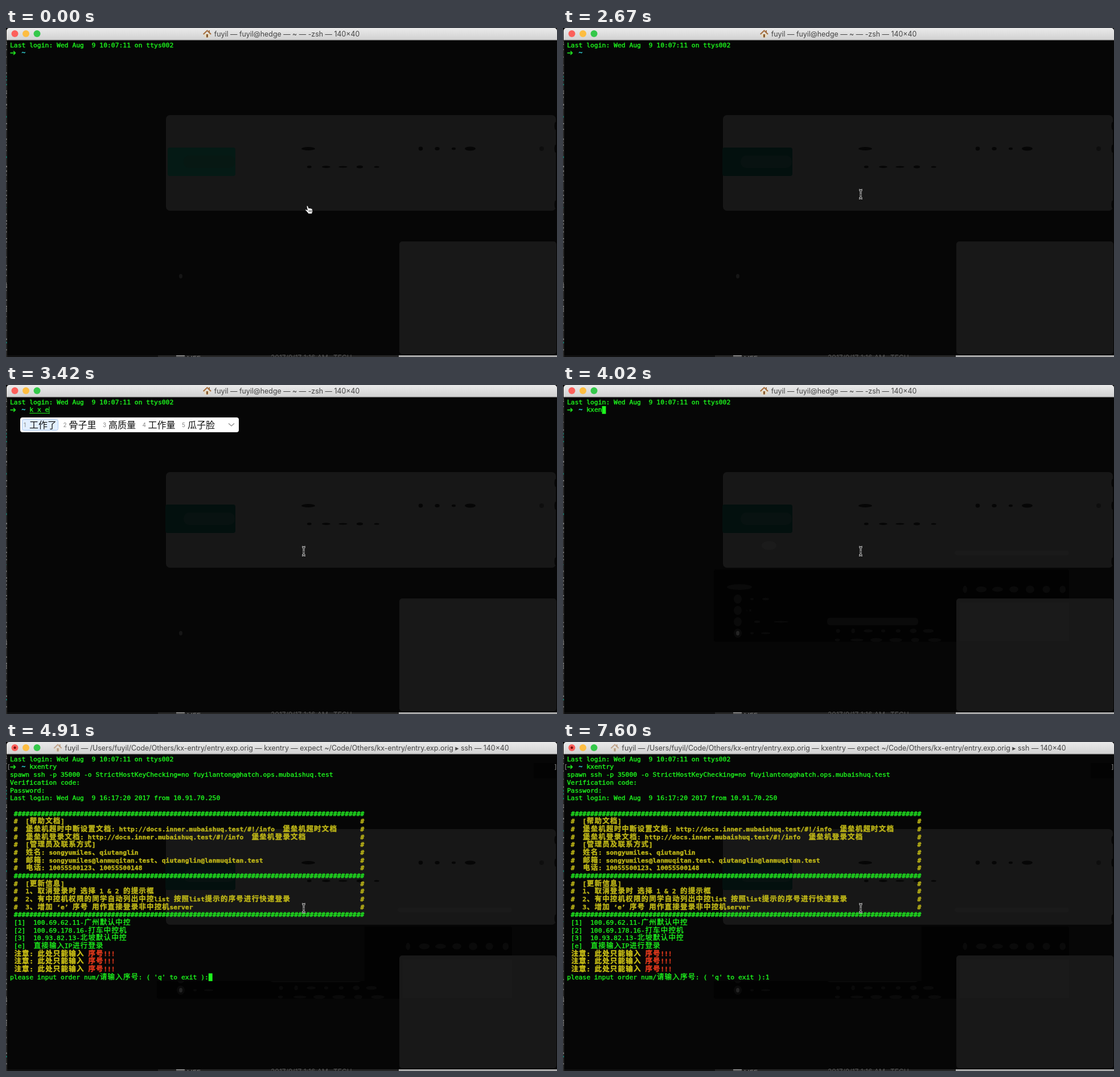
An HTML page with a canvas for the animation above (8000 ms loop, 968 by 578 pixels).

```html
<!DOCTYPE html>
<html lang="zh-CN">
<head>
<meta charset="utf-8">
<title>Terminal login</title>
<style>
html, body { margin: 0; width: 100%; height: 100%; overflow: hidden; background: #060606; }
canvas { display: block; }
</style>
</head>
<body>
<canvas id="stage" width="968" height="578"></canvas>
<script>
const ctx = document.getElementById('stage').getContext('2d');
const LOOP = 8000, LEFT = 7, TOP = 23.4, CELL = 6.84, LINE = 13.68;
const MONO = '11.36px "DejaVu Sans Mono", monospace';
const CJK = '"Noto Sans CJK SC", "Noto Sans CJK", sans-serif';
const UI = 'Inter, "DejaVu Sans", sans-serif';
const GREEN = '#1df51d', BOLD_GREEN = '#1fdf1f', YELLOW = '#bcb417', AMBER = '#cbc016', RED = '#e2391c', CYAN = '#2fc4c8';

const colX = col => LEFT + col * CELL;
const rowY = row => TOP + row * LINE;

function seeded(seed) {
  return () => (seed = seed * 16807 % 2147483647) / 2147483647;
}

function rect(x, y, w, h, color) {
  ctx.fillStyle = color;
  ctx.fillRect(x, y, w, h);
}

function rounded(x, y, w, h, r, fill, stroke) {
  ctx.beginPath();
  ctx.roundRect(x, y, w, h, r);
  ctx.fillStyle = fill;
  ctx.fill();
  if (!stroke) return;
  ctx.strokeStyle = stroke;
  ctx.lineWidth = 1;
  ctx.stroke();
}

function blob(x, y, rx, ry, color) {
  ctx.fillStyle = color;
  ctx.beginPath();
  ctx.ellipse(x, y, rx, ry, 0, 0, 7);
  ctx.fill();
}

// A row of irregular dark spots
function smudges(count, x, y, width, height, color) {
  const random = seeded(count * 977 + y);
  const step = width / count;
  for (let i = 0; i < count; i++) {
    blob(x + (i + .5) * step, y, step * (.12 + random() * .25), height * (.3 + random() * .2), color);
  }
}

function label(text, x, y, font, color) {
  ctx.font = font;
  ctx.fillStyle = color;
  ctx.fillText(text, x, y);
}

// Terminal text: wide characters take two cells; returns the column after the text
function put(row, col, text, color = GREEN, bold = false) {
  const y = rowY(row) + 10.4, weight = bold ? 'bold ' : '';
  ctx.strokeStyle = color;
  ctx.lineWidth = .4;
  for (const part of text.match(/[\u2e80-\uffef]|[^\u2e80-\uffef]+/g) || []) {
    const wide = part > '\u2e80';
    const x = colX(col) + (wide ? .6 : 0);
    label(part, x, y, weight + (wide ? '12.5px ' + CJK : MONO), color);
    ctx.strokeText(part, x, y);
    col += wide ? 2 : part.length;
  }
  return col;
}

function drawBackdrop(settled) {
  rect(0, 0, 968, 578, '#060606');
  rounded(281, 153, 685, 168, 7, '#171717');
  rounded(691, 375, 276, 198, 5, '#181818');
  rounded(settled ? 280 : 284, 210, settled ? 123 : 119, 50, 4, settled ? '#03100e' : '#051a15');
  rounded(312, 224, 90, 22, 10, settled ? '#081211' : '#071813');
  smudges(4, 714, 212, 116, 7, '#060606');
  smudges(5, 518, 244, 148, 5, '#060606');
  blob(531, 212, 12, 3, '#060606');
  blob(941, 212, 4, 4, '#0e0e0e');
  blob(307, 436, 3, 4, '#161616');
  for (const y of [172, 212, 310]) blob(965.5, y, 2, 7, '#060606');
}

function drawShadows() {
  rounded(265, 324, 624, 127, 4, '#020202');
  blob(310, 355, 22, 5, '#0a0a0a');
  for (let y = 376; y <= 436; y += 20) {
    blob(307, y, 7, 8, '#0a0a0a');
    smudges(2, 320, y, 12 + (y % 3) * 36, 5, '#0a0a0a');
  }
  blob(307, 436, 3, 4, '#242424');
  rounded(464, 409, 160, 13, 5, '#0a0a0a');
  smudges(7, 470, 432, 185, 9, '#0a0a0a');
  smudges(6, 465, 448, 205, 8, '#0a0a0a');
  smudges(7, 692, 359, 200, 14, '#0a0a0a');
  blob(362, 282, 13, 8, '#1b1b1b');
  rounded(688, 291, 201, 8, 4, '#1a1a1a');
  rounded(691, 375, 276, 198, 5, '#181818');
  rect(697, 382, 192, 68, '#1a1a1a');
}

function drawEdges() {
  rect(0, 21, 2, 557, '#292929');
  const random = seeded(11);
  for (let y = 24; y < 574; y += 3 + random() * 14) {
    rect(0, y, 1 + random(), 1 + random() * 2, random() < .1 ? '#177d70' : '#777');
  }
  rect(2, 575, 966, 3, '#101010');
  rect(267, 575, 423, 3, '#252525');
  rect(690, 575, 278, 3, '#a9a9a9');
  rect(299, 575, 15, 2, '#8b8b8b');
  const font = '12px ' + UI;
  label('LIFE ▾', 318, 584.5, font, '#777');
  label('2017/9/17 1:16 AM', 465, 583, font, '#555');
  label('TECH', 575, 583, font, '#555');
}

function drawHouse(x, alpha) {
  ctx.save();
  ctx.globalAlpha = alpha;
  rect(x + 2, 10, 9.5, 6.5, '#e9dcc0');
  rect(x + 5.2, 11, 3, 5.5, '#86572f');
  rect(x + 9.5, 4, 1.8, 4, '#9b6a3e');
  ctx.strokeStyle = '#a46b39';
  ctx.lineWidth = 2;
  ctx.stroke(new Path2D(`M${x} 11 l6.7 -6.4 l6.7 6.4`));
  ctx.restore();
}

function drawTitleBar(running) {
  const shade = ctx.createLinearGradient(0, 0, 0, 21);
  shade.addColorStop(0, '#eaeaea');
  shade.addColorStop(1, '#d1d1d1');
  rounded(1, 0, 967, 21, [5, 5, 0, 0], shade);
  rect(1, 20.5, 967, 1, '#a8a8a8');
  ['#fc605b', '#fdbd41', '#34c84a'].forEach((color, i) => blob(15.5 + i * 19.5, 10, 6, 6, color));
  if (running) blob(15.5, 10, 2.2, 2.2, '#7c0d0a');
  const title = running
    ? 'fuyil — /Users/fuyil/Code/Others/kx-entry/entry.exp.orig — kxentry — expect ~/Code/Others/kx-entry/entry.exp.orig ▸ ssh — 140×40'
    : 'fuyil — fuyil@hedge — ~ — -zsh — 140×40';
  ctx.font = '12.4px ' + UI;
  const x = 484 - (ctx.measureText(title).width + 19) / 2;
  drawHouse(x, running ? .5 : 1);
  label(title, x + 19, 14.6, ctx.font, '#444');
}

const COMPOSING = [
  { from: 3120, typed: 'k', choices: '个 给 过 跟 该 高 更 国 归' },
  { from: 3270, typed: 'k x', choices: '工作 关注 规则 感知 改造 观众' },
  { from: 3420, typed: 'k x e', choices: '工作了 骨子里 高质量 工作量 瓜子脸' },
  { from: 3870, typed: 'k x en', choices: '工作咯 柜子里 鸽子笼 高走廊 关注咯' }];
const COMMIT = 4020;

function drawComposer({ typed, choices }) {
  const end = colX(put(1, 5, typed));
  rect(colX(5), 49, end - colX(5), 1, GREEN);
  rect(end, 38, 1, 13, GREEN);
  rounded(25, 57, 384, 26, 4, '#fff');
  let x = 31;
  choices.split(' ').forEach((word, i) => {
    const width = word.length * 16;
    if (!i) rounded(28.5, 60.5, width + 15, 19, 3, '#e2efff', '#a8c9f2');
    label(i + 1, x, 73.5, '10px ' + UI, '#888');
    label(word, x + 10, 75.5, '16px ' + CJK, '#111');
    x += width + 21.5;
  });
  ctx.strokeStyle = '#8a8a8a';
  ctx.lineWidth = 1.2;
  ctx.stroke(new Path2D('M391 67.5 l5 4.5 l5 -4.5'));
}

const HELP = [
  '[帮助文档]',
  '堡垒机超时中断设置文档: http://docs.inner.mubaishuq.test/#!/info  堡垒机超时文档',
  '堡垒机登录文档: http://docs.inner.mubaishuq.test/#!/info  堡垒机登录文档',
  '[管理员及联系方式]',
  '姓名: songyumiles、qiutanglin',
  '邮箱: songyumiles@lanmuqitan.test、qiutanglin@lanmuqitan.test',
  '电话: 10055500123、10055500148',
  '',
  '[更新信息]',
  '1、取消登录时 选择 1 & 2 的提示框',
  '2、有中控机权限的同学自动列出中控list 按照list提示的序号进行快速登录',
  '3、增加 ‘e’ 序号 用作直接登录非中控机server',
  ''];
const MENU = [
  '[1]  100.69.62.11-广州默认中控',
  '[2]  100.69.178.16-打车中控机',
  '[3]  10.93.82.13-北坡默认中控',
  '[e]  直接输入IP进行登录'];

function drawWelcome() {
  put(5, 0, 'Last login: Wed Aug  9 16:17:20 2017 from 10.91.70.250');
  ['', ...HELP].forEach((text, i) => {
    const row = 7 + i;
    if (!text) return put(row, 1, '#'.repeat(90), BOLD_GREEN, true);
    for (const col of [1, 90]) put(row, col, '#', YELLOW, true);
    put(row, 4, text, YELLOW, true);
  });
  MENU.forEach((text, i) => put(21 + i, 1, text));
  for (let row = 25; row < 28; row++) {
    const col = put(row, 1, '注意: 此处只能输入 ', AMBER, true);
    put(row, col, '序号!!!', RED, true);
  }
}

// Output in order of time; the cursor follows the latest entry
const OUTPUT = [
  { at: 0, row: 0, text: 'Last login: Wed Aug  9 10:07:11 on ttys002' },
  { at: 0, row: 1, col: 5, text: '' },
  { at: COMMIT, row: 1, col: 5, text: 'kxen' },
  { at: 4170, row: 1, col: 9, text: 'try ' },
  { at: 4320, row: 2, text: '' },
  { at: 4470, row: 2, text: 'spawn ssh -p 35000 -o StrictHostKeyChecking=no fuyilantong@hatch.ops.mubaishuq.test' },
  { at: 4470, row: 3, text: '' },
  { at: 4620, row: 3, text: 'Verification code: ' },
  { at: 4760, row: 4, text: 'Password:' },
  { at: 4760, row: 5, text: '' },
  { at: 4910, row: 28, text: "please input order num/请输入序号: ( 'q' to exit ):" },
  { at: 6260, row: 28, col: 51, text: '1' },
  { at: 6400, row: 29, text: '' }];
const CURSOR_TOGGLES = [140, 730, 1170, 1620, 2220, 2670, COMMIT, 5660, 6110, 7600];

function drawTerminal(t) {
  label('➜', LEFT - .5, rowY(1) + 11, 'bold 14px "DejaVu Sans", sans-serif', BOLD_GREEN);
  put(1, 3, '~', CYAN, true);
  if (t >= 4170) {
    label('[', 1.5, rowY(1) + 10.4, MONO, '#8b8b8b');
    label(']', 962, rowY(1) + 10.4, MONO, '#8b8b8b');
  }
  if (t >= 4910) drawWelcome();

  let cursorRow, cursorCol;
  for (const { at, row, col = 0, text } of OUTPUT) {
    if (at > t) break;
    cursorCol = put(row, col, text);
    cursorRow = row;
  }
  const toggled = CURSOR_TOGGLES.filter(time => time <= t).length;
  if (toggled % 2) rect(colX(cursorCol), rowY(cursorRow), CELL, LINE, GREEN);

  const composing = COMPOSING.findLast(({ from }) => from <= t);
  if (composing && t < COMMIT) drawComposer(composing);
}

const HAND = new Path2D('M528 313 q1.5 -1.5 2.6 .5 l1.2 3.2 q1.4 -1 2.2 .2 q1.4 -.8 2.1 .5 q1.7 -.6 2 1.1 l.4 4 l-1.1 3.8 h-6 l-2.3 -3 l-3.4 -3.3 q.4 -2.2 2.9 -.4 l1 .6 z');
const FINGERS = new Path2D('M532.3 320 v3.5 M534.4 320 v3.5 M536.4 320 v3.5');
const BEAM = new Path2D('M-3 -7.5 Q0 -7.5 0 -5 Q0 -7.5 3 -7.5 M0 -5 V5 M-3 7.5 Q0 7.5 0 5 Q0 7.5 3 7.5 M-1.5 1 H1.5');

function outline(path, width, color) {
  ctx.lineWidth = width;
  ctx.strokeStyle = color;
  ctx.stroke(path);
}

function drawPointer(t) {
  ctx.save();
  if (t < 1620) {
    ctx.fillStyle = '#fff';
    ctx.fill(HAND);
    outline(HAND, .8, '#111');
    outline(FINGERS, .8, '#111');
  } else {
    ctx.translate(...(t < 1770 ? [530, 310] : [523, 292]));
    outline(BEAM, 2.8, '#e4e4e4');
    outline(BEAM, 1.1, '#111');
  }
  ctx.restore();
}

function draw(t) {
  drawBackdrop(t >= 140);
  if (t >= COMMIT) drawShadows();
  if (t >= 4470) rect(927, 37, 40, 27, '#030303');
  if (t >= 4910) {
    ctx.save();
    ctx.beginPath();
    ctx.rect(7, 92, 623, 328);
    ctx.clip();
    drawBackdrop(true);
    ctx.restore();
  }
  drawEdges();
  drawTitleBar(t >= 4470);
  drawTerminal(t);
  drawPointer(t);
}

function tick() {
  draw(performance.now() % LOOP);
  requestAnimationFrame(tick);
}
tick();
</script>
</body>
</html>
```
